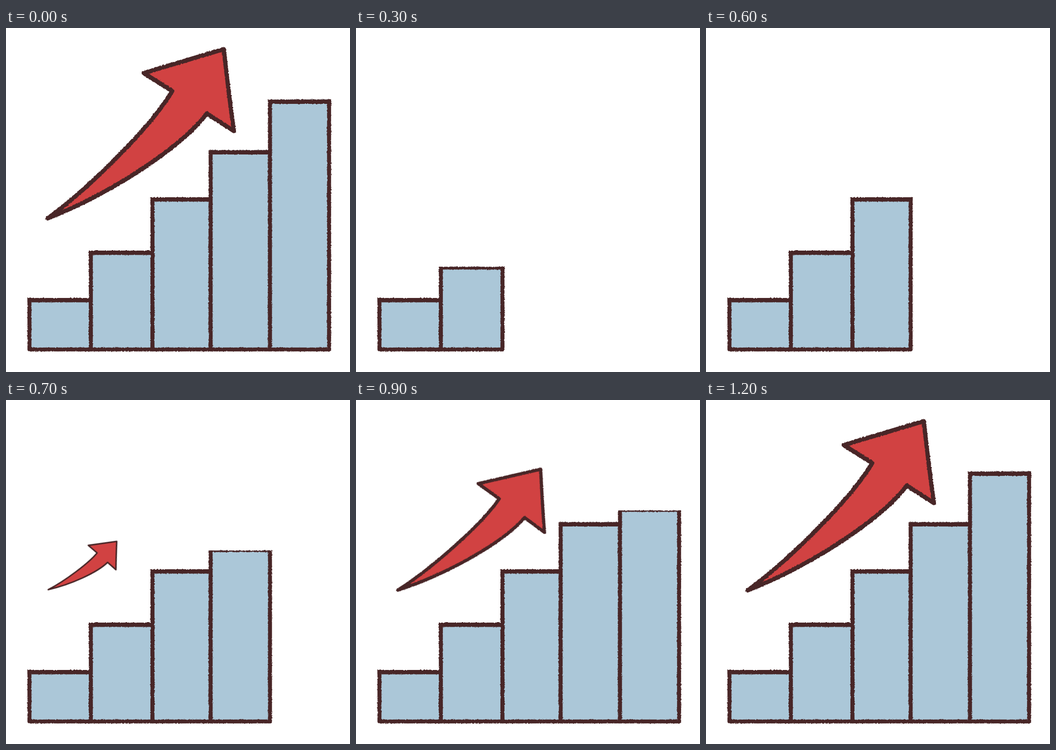
Write an HTML page that moves like this. It is 748x748 px and loops after 1900 ms.

```html
<!DOCTYPE html>
<html lang="en">
<head>
<meta charset="utf-8">
<title>Growing bar chart</title>
<style>
  html, body { margin: 0; width: 100%; height: 100%; overflow: hidden; background: #fff; }
  svg { display: block; width: 100%; height: 100%; }
  path { stroke: #482627; stroke-linejoin: round; }
  .bar { fill: #abc7d8; stroke-width: 8.7; }
  .lid { fill: none; }
  #arrow { fill: #d14242; stroke-width: 9.3; }
</style>
</head>
<body>
<svg viewBox="0 0 748 748">
  <filter id="rough" color-interpolation-filters="sRGB">
    <feTurbulence type="fractalNoise" baseFrequency=".28" numOctaves="2" seed="4"/>
    <feDisplacementMap in="SourceGraphic" scale="3.5" xChannelSelector="R" yChannelSelector="G"/>
  </filter>
  <g id="bars" filter="url(#rough)"></g>
  <path id="arrow" filter="url(#rough)" d="M0 0C95 -69 230 -206 271 -277L209 -316L383 -368Q394 -270 405 -190L346 -228C290 -153 135 -53 0 0Z"/>
</svg>
<script>
const STEP = 100, LAST = 12, LOOP = 1900;
const BASE = 699, EDGE = 4.3, LID = 9.6, ARROW_START = 7;

const posts = [51, 184.5, 318.5, 445, 574, 702.5]; // lines between the bars
const tops = [587, 484, 368, 265.5, 155.5];        // upper edge of each bar

const bars = document.getElementById('bars');
const arrow = document.getElementById('arrow');

// Each bar spends one step short, with a thinner lid, and then stands at full height
function barPath(top, i, step) {
  const first = 2 * i + 1;
  if (step < first) return '';
  const short = step === first;
  const y = short ? top + 32 + 3.3 * i * i : top;
  const lid = short ? 9 / (1 + i / 2) : LID;
  const left = posts[i], right = posts[i + 1];
  return `<path class="bar" d="M${left} ${y}V${BASE}H${right}V${y}"/>` +
    `<path class="lid" stroke-width="${lid}" d="M${left - EDGE} ${y + lid / 2}H${right + EDGE}"/>`;
}

// The arrow grows and turns evenly, overshoots, then settles
function drawArrow(step) {
  const k = step - ARROW_START, settled = step === LAST;
  arrow.style.display = k < 0 ? 'none' : '';
  const scale = settled ? 1 : Math.min(0.343 + 0.2115 * k, 1.05);
  const turn = settled ? 0 : 8.7 - 2.55 * k;
  const x = 92.5 - 2 * scale, y = 411.5 + 2.5 * scale;
  arrow.setAttribute('transform', `translate(${x} ${y}) rotate(${turn}) scale(${scale})`);
}

let shown;
function tick() {
  // The loop opens on the finished chart
  const step = Math.min(Math.floor(performance.now() % LOOP / STEP), LAST) || LAST;
  if (step !== shown) {
    shown = step;
    bars.innerHTML = tops.map((top, i) => barPath(top, i, step)).join('');
    drawArrow(step);
  }
  requestAnimationFrame(tick);
}
tick();
</script>
</body>
</html>
```
